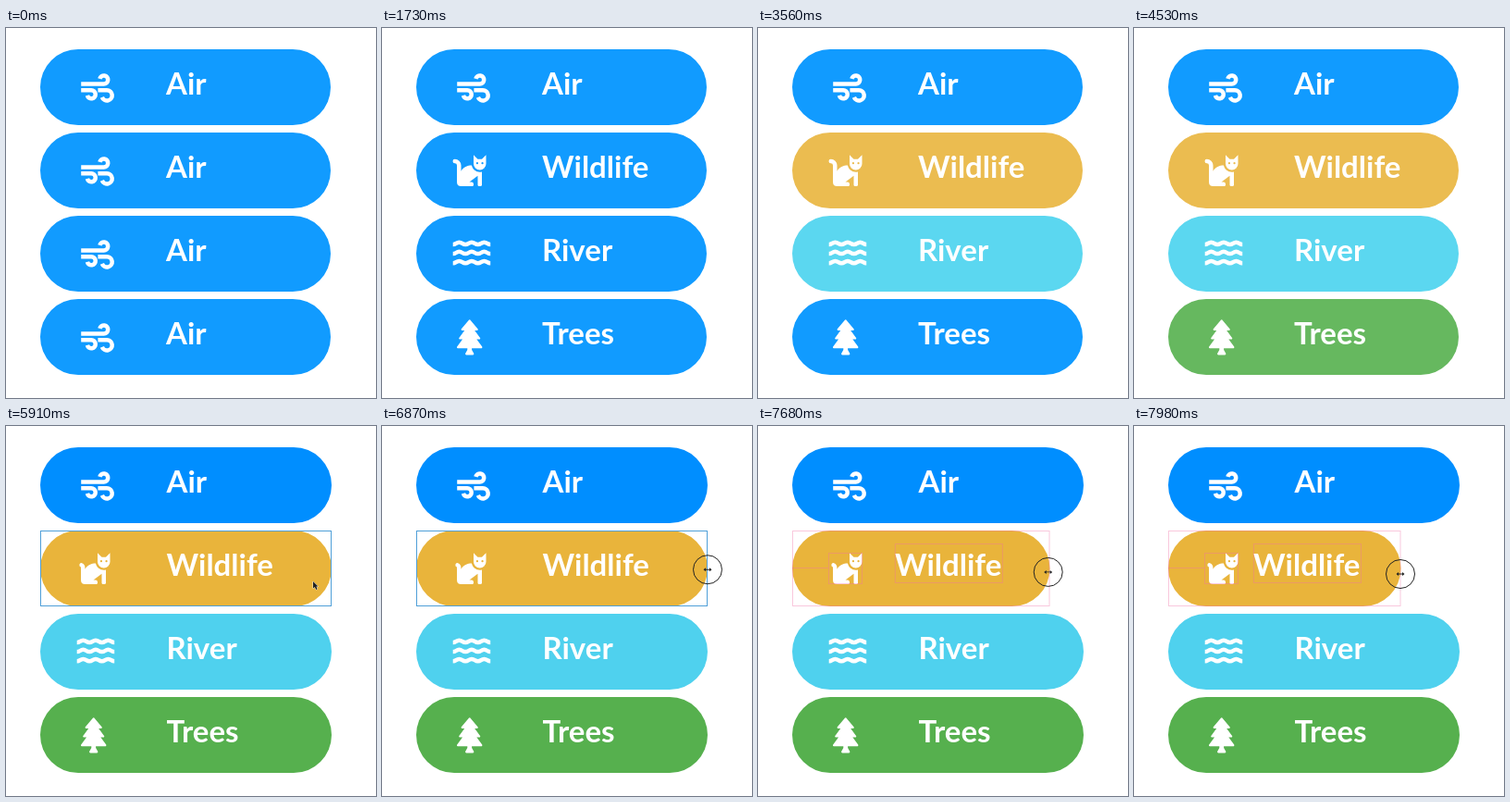
An HTML page with a canvas that plays this animation: 400x400 px, repeating every 8 s.

```html
<!DOCTYPE html>
<html lang="en">
<head>
<meta charset="utf-8">
<title>Nature buttons</title>
<style>
  html, body { margin: 0; width: 100%; height: 100%; overflow: hidden; background: #fff; }
  canvas { display: block; width: 400px; height: 400px; }
</style>
</head>
<body>
<canvas id="stage"></canvas>
<script>
const LOOP = 8000, LIVE = 5460, DRAG = 7200;
const canvas = document.getElementById('stage');
const ratio = window.devicePixelRatio || 1;
canvas.width = canvas.height = 400 * ratio;
const ctx = canvas.getContext('2d');

const path = d => new Path2D(d);
const wave = 'c48 0 48-32 96-32s48 32 96 32 48-32 96-32 48 32 96 32 48-32 96-32 48 32 96 32';
const shapes = {
  wind: path('M3 192H352A64 64 0 1 0 290 112M3 288H160A64 64 0 1 1 98 368M262 288H400A80 80 0 1 1 325 397'),
  waves: path(`M0 128${wave}M0 272${wave}M0 416${wave}`),
  tree: path('M192 18L299 146H237L332 274H268L361 402H210V445L240 498H144L174 445V402H23L116 274H52L147 146H85Z'),
  tail: path('M32 128A64 64 0 0 1 96 192V400'),
  lowTail: path('M72 218Q96 224 96 270V400'),
  cat: path('M291 192C270 192 184 194 128 278L64 300V448Q64 512 128 512H304Q320 512 320 496V480Q320 448 288 448H256L384 352V496Q384 512 400 512H432Q448 512 448 496V290C380 309 306 266 291 192Z'
    + 'M448 96H384L320 32V166A96 96 0 0 0 512 166V32Z'
    + 'M360 160a16 16 0 1 0 32 0a16 16 0 1 0-32 0M440 160a16 16 0 1 0 32 0a16 16 0 1 0-32 0')
};

const icons = {
  wind() { ctx.lineWidth = 64; ctx.stroke(shapes.wind); },
  waves() { ctx.lineWidth = 64; ctx.stroke(shapes.waves); },
  tree() { ctx.lineWidth = 28; ctx.fill(shapes.tree); ctx.stroke(shapes.tree); },
  cat(live) {
    ctx.fill(shapes.cat, 'evenodd');
    ctx.lineWidth = 64;
    ctx.lineCap = 'round';
    ctx.stroke(live ? shapes.lowTail : shapes.tail);
  }
};

// dx, dy: icon corner inside the pill row
const rows = [
  { label: 'Air', icon: 'wind', dx: 81, dy: 24, size: .0703, flat: '#119bff', vivid: '#008eff', tint: 0 },
  { label: 'Wildlife', icon: 'cat', dx: 76.5, dy: 22, size: .0703, flat: '#ebbc50', vivid: '#e9b43b', tint: 2630 },
  { label: 'River', icon: 'waves', dx: 76.7, dy: 22, size: .0703, flat: '#5bd7f0', vivid: '#4fd1ee', tint: 3560 },
  { label: 'Trees', icon: 'tree', dx: 80.3, dy: 22, size: .075, flat: '#66b85f', vivid: '#56b04e', tint: 4530 }
];

// Linear interpolation through [time, value] pairs
function track(t, ...keys) {
  if (t <= keys[0][0]) return keys[0][1];
  for (let i = 1; i < keys.length; i++) {
    const [t0, v0] = keys[i - 1], [t1, v1] = keys[i];
    if (t < t1) return v0 + (v1 - v0) * (t - t0) / (t1 - t0);
  }
  return keys[keys.length - 1][1];
}

function drawIcon(row, y, live) {
  ctx.save();
  ctx.translate(row.dx, y + row.dy);
  ctx.scale(row.size, row.size);
  ctx.lineJoin = 'round';
  icons[row.icon](live);
  ctx.restore();
}

function drawRow(row, i, t, right) {
  const live = t >= LIVE, y = 23 + 90 * i;
  ctx.fillStyle = live ? row.vivid : t >= row.tint ? row.flat : rows[0].flat;
  ctx.beginPath();
  ctx.roundRect(37, y, right - 37, 82, 41);
  ctx.fill();

  ctx.fillStyle = ctx.strokeStyle = '#fff';
  drawIcon(t < 1730 ? rows[0] : row, y, live);
  const shift = live ? .5 - .7 * (352 - right) : 0;
  ctx.fillText(t < 830 ? 'Air' : row.label, 173 + shift, y + 49);
}

function outline(color, x, y, right, bottom) {
  ctx.strokeStyle = color;
  ctx.lineWidth = 1;
  ctx.strokeRect(x + .5, y + .5, right - x - 1, bottom - y - 1);
}

function drawGuides(right) {
  const pink = 'rgba(240,110,165,.38)', x = 165 - .7 * (340 - right);
  outline(pink, 37, 113, right, 195);
  outline(pink, 76, 137, 113, 171);
  outline(pink, x, 127, x + 117, 170);
  ctx.beginPath();
  ctx.moveTo(37, 153.5);
  ctx.lineTo(76, 153.5);
  ctx.stroke();
}

function drawPointer(t) {
  const x = track(t, [LIVE, 378], [5880, 332], [6250, 332], [6700, 352], [DRAG, 352], [7410, 337], [7980, 288]);
  const y = track(t, [LIVE, 192], [5880, 168], [6250, 168], [6700, 155], [7410, 156], [7980, 160]);
  ctx.save();
  ctx.translate(x, y);
  ctx.lineWidth = 1;
  ctx.fillStyle = '#222';
  if (t < 6700) {
    ctx.strokeStyle = 'rgba(255,255,255,.8)';
    const arrow = path('M0 0V7.5L1.8 6L3.2 9L4.6 8.3L3.3 5.5H5.5Z');
    ctx.stroke(arrow);
    ctx.fill(arrow);
  } else {
    ctx.strokeStyle = '#222';
    ctx.beginPath();
    ctx.arc(0, 0, 15.5, 0, Math.PI * 2);
    ctx.stroke();
    ctx.fill(path('M-4.5 0L-2-2V2ZM4.5 0L2-2V2ZM-2-.4H2V.4H-2Z'));
  }
  ctx.restore();
}

function draw(t) {
  ctx.setTransform(ratio, 0, 0, ratio, 0, 0);
  ctx.fillStyle = '#fff';
  ctx.fillRect(0, 0, 400, 400);
  ctx.font = '700 33px Lato, sans-serif';

  const live = t >= LIVE, full = live ? 352 : 351;
  const right = track(t, [7220, full], [7410, 340], [7980, 288.5]);
  rows.forEach((row, i) => drawRow(row, i, t, i === 1 ? right : full));
  if (!live) return;
  if (t >= DRAG) drawGuides(right);
  else if (t >= 5760) outline('#4f9fd8', 37, 113, 352, 195);
  drawPointer(t);
}

function frame() {
  draw(performance.now() % LOOP);
  requestAnimationFrame(frame);
}
frame();
</script>
</body>
</html>
```
